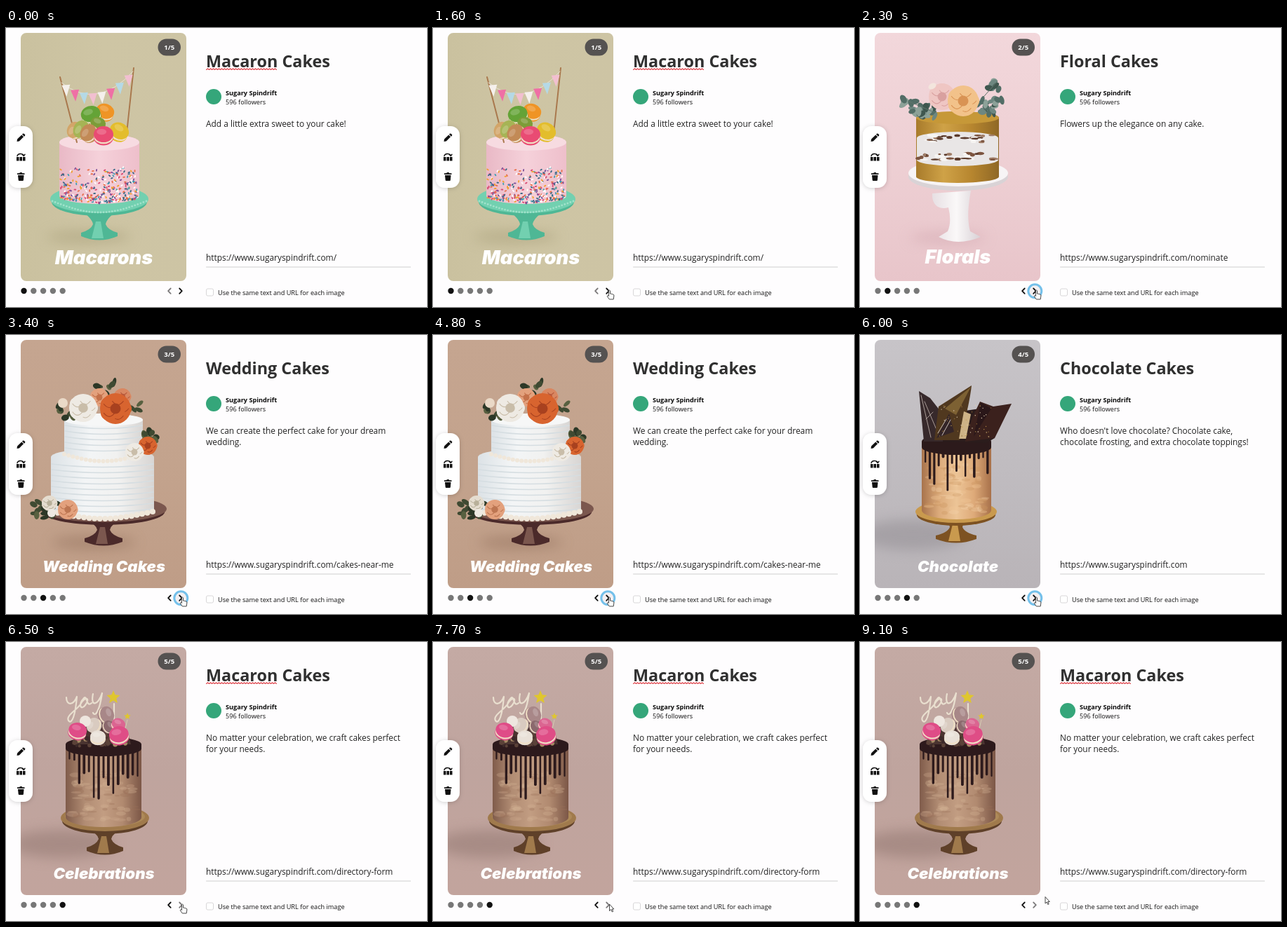
An HTML page that plays this animation: 600x398 px, repeating every 9.2 s.

```html
<!DOCTYPE html>
<html lang="en">
<head>
<meta charset="utf-8">
<style>
  html, body { margin: 0; width: 100%; height: 100%; overflow: hidden; background: #fefdfe; }
  svg { display: block; width: 600px; height: 398px; font-family: "Open Sans", "Noto Sans", sans-serif; fill: #222; }
  .title { font-size: 23.4px; font-weight: 700; fill: #303030; }
  .body { font-size: 11.9px; }
  .small { font-size: 9.17px; fill: #111; }
  .name { font-size: 9.15px; font-weight: 700; fill: #0a0a0a; }
  .badge { font-size: 9.6px; font-weight: 700; fill: #fff; text-anchor: middle; }
  .caption { font-family: Inter, sans-serif; font-weight: 900; font-style: italic; fill: #fff; text-anchor: middle; }
</style>
</head>
<body>
<svg id="stage" viewBox="0 0 600 398"></svg>
<script>
let seed = 7;
const rand = (lo = 0, hi = 1) => {
  seed = (seed * 16807) % 2147483647;
  return lo + (hi - lo) * seed / 2147483647;
};
const pick = list => list[Math.floor(rand(0, list.length))];
const times = (n, fn) => Array.from({ length: n }, (_, i) => fn(i)).join('');

// Shape helpers returning SVG markup
const oval = (x, y, rx, ry, fill, angle = 0) =>
  `<ellipse cx="${x}" cy="${y}" rx="${rx}" ry="${ry}" fill="${fill}" transform="rotate(${angle} ${x} ${y})"/>`;
const disc = (x, y, r, fill) => oval(x, y, r, r, fill);
const shape = (d, fill) => `<path d="${d}" fill="${fill}"/>`;
const line = (d, stroke, width = 1) =>
  `<path d="${d}" fill="none" stroke="${stroke}" stroke-width="${width}" stroke-linecap="round" stroke-linejoin="round"/>`;
const text = (x, y, cls, str) => `<text x="${x}" y="${y}" class="${cls}">${str}</text>`;
const soft = markup => `<g filter="url(#blur)" opacity=".5">${markup}</g>`;
const gradient = (id, stops, vertical) =>
  `<linearGradient id="${id}" ${vertical ? 'x2="0" y2="1"' : ''}>` +
  stops.map((c, i) => `<stop offset="${i / (stops.length - 1)}" stop-color="${c}"/>`).join('') + '</linearGradient>';

const barrel = (x1, x2, top, bottom, ry, fill) => {
  const rx = (x2 - x1) / 2;
  return shape(`M${x1} ${top}A${rx} ${ry} 0 0 1 ${x2} ${top}V${bottom}A${rx} ${ry} 0 0 1 ${x1} ${bottom}Z`, fill);
};
const stand = (x, y, rx, ry, foot, footRx, fill, shade) => {
  const neck = foot - 17, under = y + ry * .8;
  return shape(`M${x - 26} ${under}Q${x - 10} ${neck - 8} ${x - 9} ${neck}Q${x - 12} ${foot - 9} ${x - footRx} ${foot - 5}V${foot}Q${x} ${foot + 11} ${x + footRx} ${foot}V${foot - 5}Q${x + 12} ${foot - 9} ${x + 9} ${neck}Q${x + 10} ${neck - 8} ${x + 26} ${under}Z`, shade) +
    shape(`M${x - 5} ${neck - 4}H${x + 2}L${x + 6} ${foot + 3}H${x - 11}Z`, fill) +
    oval(x, y + 4, rx * .97, ry, shade) + oval(x, y, rx, ry, fill);
};
const macaron = (x, y, r, fill, angle = 0) =>
  `<g transform="rotate(${angle} ${x} ${y})">` + oval(x, y + r * .25, r, r * .78, fill) +
  oval(x, y + r * .2, r * .97, r * .68, '#f0dfc4') + oval(x, y - r * .1, r, r * .82, fill) +
  oval(x - r * .2, y - r * .35, r * .5, r * .3, '#ffffff2e') + '</g>';
const rose = (x, y, r, outer, inner) => disc(x, y, r, outer) +
  times(5, i => {
    const a = i * 1.257, px = x + Math.cos(a) * r * .5, py = y + Math.sin(a) * r * .5;
    return oval(px, py, r * .55, r * .48, outer) +
      line(`M${px - r * .35} ${py}q${r * .35} ${r * .45} ${r * .7} 0`, inner, 1.1);
  }) + disc(x, y, r * .34, inner);
const leaves = (x, y, n, spread, colors) => times(n, () =>
  oval(x + rand(-spread, spread), y + rand(-spread, spread) * .7, rand(4, 7), rand(2.5, 4.5), pick(colors), rand(0, 180)));
const drips = (x1, x2, y, dark, longest) => times(15, i => {
  const u = (i + .5) / 15, x = x1 + (x2 - x1) * u, top = y + 9 * Math.sin(Math.PI * u);
  return line(`M${x} ${top}V${top + rand(.15, 1) * longest}`, dark, rand(2.2, 4));
});
const frosting = (x1, x2, y1, y2, colors) => times(70, () =>
  oval(rand(x1 + 8, x2 - 8), rand(y1, y2), rand(3, 9), rand(1, 4), pick(colors)));
const star = (x, y, r) => shape('M' + Array.from({ length: 10 }, (_, i) => {
  const a = i * Math.PI / 5 - Math.PI / 2, q = i % 2 ? r * .45 : r;
  return `${x + q * Math.cos(a)} ${y + q * Math.sin(a)}`;
}).join('L') + 'Z', '#dfc62e');

function macaronCake() {
  const flags = ['#f5f0ec', '#ef6fa5', '#b5d9e6', '#f2bfd0'];
  const confetti = ['#d94a72', '#3f9fb3', '#f0a02e', '#7a4f9a', '#fff', '#e86f4a', '#3a6a86'];
  const rope = u => [79 + 102 * u, 78 - 16 * u + 96 * u * (1 - u)];
  return soft(oval(118, 298, 60, 9, '#a39a74')) + stand(133, 244, 70, 20, 297, 26, '#72d0b0', '#4fb795') +
    times(34, i => disc(66 + i * 4.06, 247 + 16 * Math.sin(Math.PI * i / 33), 1.4, '#a2e2cb')) +
    barrel(76, 190, 163, 239, 12, 'url(#pinkCake)') + oval(133, 163, 57, 12, '#f7dbe1') +
    times(310, () => {
      const x = rand(78, 188), y = 250 - 48 * rand() ** 1.8 - Math.abs(x - 133) * .12;
      return oval(x, y, 1.9, 1, pick(confetti), rand(0, 180));
    }) +
    line('M77 70L101 163M182 57L172 150', '#a9784d', 2) +
    line('M79 78Q130 118 181 62', '#e9e2d4') +
    times(8, i => {
      const [x, y] = rope((i + .5) / 8);
      return shape(`M${x - 6} ${y - 1}L${x + 6} ${y - 2}L${x + 1} ${y + 15}Z`, flags[i % 4]);
    }) +
    macaron(141, 120, 13, '#ef9425', 20) + macaron(121, 124, 14, '#64a337', -15) +
    macaron(131, 137, 11, '#7c9c38', 20) + macaron(98, 146, 12, '#d2a569', -65) +
    macaron(108, 145, 13, '#a6b455', -60) + macaron(118, 150, 13, '#c28a56', -55) +
    macaron(161, 148, 14, '#e3bd2c', 30) + macaron(139, 153, 14, '#e94b73');
}

function floralCake() {
  const green = ['#526d66', '#6d8780', '#3f574f', '#8ca198'];
  return soft(oval(125, 299, 55, 8, '#cfa3ac')) +
    shape('M103 236C102 252 112 260 126 256Q131 276 125 290L112 298Q139 312 172 298L157 290Q151 268 158 232Z', 'url(#china)') +
    oval(140, 212, 71, 20, '#d9d3d6') + oval(140, 207, 71, 19, '#f7f4f5') +
    barrel(80, 198, 128, 212, 9, 'url(#gold)') + barrel(81, 197, 157, 188, 9, '#e9e6e6') +
    times(60, () => oval(rand(84, 194), pick([158, 183]) + rand(-5, 5), rand(2, 7), rand(1, 2.5), pick(['#5b3a2b', '#7c543f', '#a07e68', '#f7f5f3']))) +
    oval(139, 128, 59, 9, '#c69838') +
    leaves(92, 116, 20, 19, green) + leaves(70, 106, 5, 9, green) +
    leaves(180, 113, 16, 14, green) + leaves(188, 82, 6, 10, green) + leaves(196, 106, 5, 7, green) +
    line('M68 104L105 120M170 105L196 76', '#60756c') +
    rose(117, 98, 19, '#efc6c3', '#d9a09f') + rose(147, 104, 22, '#f2c28a', '#d99354') +
    oval(103, 83, 6, 4, '#f3e5dd', -30);
}

function weddingCake() {
  const green = ['#3f4a32', '#586040', '#2c3827'];
  const cream = '#eeeae3', orange = '#d8642f', peach = '#e3a17d';
  const ridges = (x1, x2, y, n) => times(n, i => line(`M${x1} ${y + i * 8}Q${(x1 + x2) / 2} ${y + 9 + i * 8} ${x2} ${y + i * 8}`, '#d5dde1', 1.6));
  const beads = (x1, x2, y, n, r) => times(n, i => disc(x1 + (x2 - x1) * i / (n - 1), y + 10 * Math.sin(Math.PI * i / (n - 1)), r, '#f0e7da'));
  return soft(oval(125, 296, 60, 9, '#8f6d59')) + stand(139, 248, 90, 19, 295, 27, '#7b574e', '#4b2a2a') +
    barrel(64, 211, 174, 250, 12, 'url(#icing)') + ridges(65, 210, 184, 9) +
    beads(66, 209, 252, 20, 4) +
    barrel(83, 195, 122, 168, 10, 'url(#icing)') + ridges(84, 194, 129, 5) + beads(83, 194, 170, 19, 3) +
    oval(139, 121, 56, 9, '#f6f7f7') +
    leaves(82, 108, 9, 15, green) + leaves(178, 100, 10, 15, green) + leaves(142, 76, 6, 13, green) +
    rose(133, 89, 13, peach, '#c4714a') + rose(166, 88, 12, '#d98761', '#b8583a') +
    rose(156, 105, 22, orange, '#a8411f') + rose(110, 104, 20, cream, '#c9bda9') + disc(81, 97, 7, '#ead9c7') +
    leaves(206, 143, 8, 10, green) + rose(202, 158, 13, orange, '#a8411f') + rose(183, 167, 13, cream, '#c9bda9') +
    leaves(56, 248, 14, 18, green) + rose(62, 240, 11, '#e5ddd0', '#b8b09a') +
    rose(88, 249, 14, peach, '#bd7652') + disc(65, 254, 6, cream);
}

function chocolateCake() {
  const dark = '#2c1a1b';
  return soft(oval(75, 285, 75, 22, '#8f8a90')) + stand(137, 252, 58, 16, 291, 29, '#c99a4e', '#7d5222') +
    barrel(88, 187, 155, 250, 13, 'url(#caramel)') +
    frosting(88, 187, 185, 254, ['#f3d3ab55', '#c9925f55', '#f0c79755']) +
    drips(90, 185, 157, dark, 56) + barrel(88, 187, 152, 160, 11, dark) +
    shape('M92 152L98 118L120 112L150 108L178 104L192 147L180 154Z', '#2b1c1c') +
    shape('M84 80L100 90L122 118L118 152L91 152Z', '#37292b') + line('M87 86L101 146M92 95L112 142M94 120L104 110', '#b7aaa4', .9) +
    shape('M159 72Q156 100 142 150H106L112 102Z', '#50381f') + shape('M158 74L137 114L121 105Z', '#7d6133') +
    shape('M216 98L192 147L150 152L160 118L171 95L190 102Z', '#3b211d') + shape('M172 96L187 105L162 145Z', '#2a1719') +
    shape('M148 109L158 113L151 148H141Z', '#cdb286') + shape('M127 112L134 138L109 147Z', '#342528') +
    line('M123 120L111 140M129 121L117 143', '#c8beb8') +
    times(55, () => disc(rand(113, 188), rand(100, 147), .7, pick(['#c49a4a', '#8f6b35', '#e0cdb0'])));
}

function celebrationCake() {
  const dark = '#2d1a1c';
  return soft(oval(80, 288, 75, 20, '#8e736d')) + stand(141, 251, 63, 19, 298, 26, '#a07a4c', '#5f4029') +
    oval(141, 249, 57, 15, '#ad8959') +
    barrel(85, 193, 150, 250, 14, 'url(#mocha)') +
    frosting(85, 193, 185, 256, ['#d3b09455', '#99715855', '#c9a58a55']) +
    drips(87, 191, 150, dark, 66) + barrel(85, 193, 146, 152, 11, dark) +
    shape('M94 146Q108 112 140 112T178 146Z', '#4a3430') +
    times(26, () => disc(rand(94, 184), rand(132, 149), rand(2, 4), pick(['#5b4238', '#a68a63', '#3c2929']))) +
    line('M86 79C86 91 96 91 101 78C99 103 94 119 89 112C85 105 101 97 106 89C112 77 121 79 113 90C107 98 102 90 111 80C116 75 114 94 122 87M124 74C120 93 131 91 137 73C133 100 127 107 124 101M154 88V130', '#e9dfcf', 2.2) +
    star(153, 79, 10) + star(173, 106, 5) + line('M173 111L168 132', '#d8c9b2') +
    macaron(143, 104, 12, '#a88788', 70) + macaron(125, 119, 11, '#d9cbc0', -60) + disc(113, 113, 8, '#eee6df') +
    macaron(102, 127, 13, '#df4c87', 12) + macaron(146, 121, 9, '#8b696d', 60) +
    macaron(131, 136, 11, '#e9e1d8') + macaron(160, 118, 10, '#db6591', 20) + macaron(161, 133, 14, '#df4d86', -10);
}

const site = 'https://www.sugaryspindrift.com';
const slides = [
  { at: 0, bg: 'khaki', art: macaronCake, caption: 'Macarons', size: 27.3, base: 336.5, title: 'Macaron Cakes', flagged: true,
    lines: ['Add a little extra sweet to your cake!'], path: '/' },
  { at: 1700, bg: 'blush', art: floralCake, caption: 'Florals', size: 27.3, base: 336, title: 'Floral Cakes',
    lines: ['Flowers up the elegance on any cake.'], path: '/nominate' },
  { at: 3100, bg: 'tan', art: weddingCake, caption: 'Wedding Cakes', size: 22.2, base: 337.5, title: 'Wedding Cakes',
    lines: ['We can create the perfect cake for your dream', 'wedding.'], path: '/cakes-near-me' },
  { at: 4900, bg: 'grey', art: chocolateCake, caption: 'Chocolate', size: 22.2, base: 337.5, title: 'Chocolate Cakes',
    lines: ["Who doesn't love chocolate? Chocolate cake,", 'chocolate frosting, and extra chocolate toppings!'], path: '' },
  { at: 6400, bg: 'mauve', art: celebrationCake, caption: 'Celebrations', size: 22.2, base: 337.5, title: 'Macaron Cakes', flagged: true,
    lines: ['No matter your celebration, we craft cakes perfect', 'for your needs.'], path: '/directory-form' },
];

const slideMarkup = (s, i) => `<g class="slide"><g clip-path="url(#card)">
  <rect x="21" y="7" width="236" height="354" fill="url(#${s.bg})"/>${s.art()}</g>
  <text x="139.5" y="${s.base}" class="caption" font-size="${s.size}">${s.caption}</text>
  <rect x="216.5" y="15.5" width="32.5" height="24" rx="12" fill="#555251"/>
  ${text(232.8, 31, 'badge', `${i + 1}/5`)}
  ${text(285, 56, 'title', s.title)}
  ${s.flagged ? line('M285.5 59.5' + 'l2 -1.6l2 1.6'.repeat(25), '#dc3a42', 1.1) : ''}
  ${s.lines.map((l, n) => text(285, 140.5 + 16.7 * n, 'body', l)).join('')}
  ${text(285, 332, 'body', site + s.path)}</g>`;

const stage = document.getElementById('stage');
stage.innerHTML = `<defs>
  <clipPath id="card"><rect x="21" y="7" width="236" height="354" rx="8"/></clipPath>
  <filter id="shadow" x="-50%" y="-30%" width="200%" height="160%"><feDropShadow dx="0" dy="1" stdDeviation="3" flood-opacity=".18"/></filter>
  <filter id="blur" x="-50%" y="-100%" width="200%" height="300%"><feGaussianBlur stdDeviation="9"/></filter>
  ${gradient('khaki', ['#cac19f', '#cec5a4', '#cdc4a4'])}
  ${gradient('blush', ['#f2d7db', '#eed0d4', '#e8c5ca'], true)}
  ${gradient('tan', ['#c5a590', '#c3a38d', '#bf9d87'], true)}
  ${gradient('grey', ['#c7c4c8', '#c0bcc0', '#b9b4b8'], true)}
  ${gradient('mauve', ['#c4aaa4', '#bfa49e', '#c2a49d'], true)}
  ${gradient('pinkCake', ['#e9b9c6', '#f5d1da', '#eebfcb'])}
  ${gradient('china', ['#e7dfe3', '#faf8f8', '#d8d0d5'])}
  ${gradient('gold', ['#a87b2b', '#cfa247', '#b7862f', '#8f6826'])}
  ${gradient('icing', ['#dce2e6', '#f3f5f6', '#f1f1f0', '#d8d5d3'])}
  ${gradient('caramel', ['#a8734c', '#dcab7b', '#ecc496', '#deaa79', '#a8714a'])}
  ${gradient('mocha', ['#805c4b', '#b18c73', '#c29d82', '#b18a70', '#7c5747'])}
</defs>
${slides.map(slideMarkup).join('')}
<rect x="4" y="140" width="34" height="88" rx="13" fill="#fff" filter="url(#shadow)"/>
<g fill="#111">
  <path d="M15.5 162l.6-3.4 6.2-6.2 2.8 2.8-6.2 6.2zM23 151.700l1-1q1-.7 2 .2l.8.8q.9 1 .2 2l-1 1z"/>
  <path d="M15 184h3.500v5.500h-3.500zM19.500 184h3.500v5.500h-3.500zM24 184h3.500v5.500h-3.500z"/>
  <path d="M17 210h8.500l-.6 7q-.1 1-1.100 1h-5q-1 0-1.100-1zM16 207.300h3.200l.7-1.300h2.700l.7 1.300h3.200v1.700h-10.500z"/>
</g>
${line('M16 182.500Q17 179 21 179.500T25 182M23.300 180.800L25.300 182.500L27 180.300', '#111', 1.4)}
${disc(296, 98, 11, '#35a67a')}
${text(313, 96, 'name', 'Sugary Spindrift')}
${text(313, 108.500, 'small', '596 followers')}
${line('M285.500 341H576.500', '#cfcfcf')}
<rect x="285.500" y="372" width="10" height="10" rx="2" fill="#fff" stroke="#d8d6d8"/>
${text(302, 381.300, 'small', 'Use the same text and URL for each image')}
${times(5, i => `<circle class="dot" cx="${25.5 + i * 13.8}" cy="375" r="4.2"/>`)}
<circle id="ring" cx="249.300" cy="375.300" r="9.500" fill="#f3eff1" stroke="#74c0ea" stroke-width="3"/>
<g fill="none" stroke-width="1.800" stroke-linecap="round" stroke-linejoin="round">
  <path id="prev" d="M234.700 371.500l-3.600 3.700 3.600 3.700"/><path id="next" d="M247.200 371.500l3.600 3.700-3.600 3.700"/>
</g>
<g id="cursor" fill="#fff" stroke="#333" stroke-width=".9" stroke-linejoin="round">
  <path id="arrow" d="M0 0V9.500L2.200 7.500 3.800 11 5.200 10.300 3.700 7H6.300Z"/>
  <path id="hand" d="M-1 .8Q0-.6 1 .8V5L2.700 5.300 4.200 5.700 5.700 6.200Q6.600 6.600 6.400 8L5.700 13H-.2L-3 9.200Q-3.500 7.700-2.200 7.600L-1 8.500Z"/>
</g>`;

const byId = id => document.getElementById(id);
const groups = [...stage.querySelectorAll('.slide')], dots = [...stage.querySelectorAll('.dot')];
const show = (node, on) => node.setAttribute('display', on ? 'inline' : 'none');
const enabled = (id, on) => byId(id).setAttribute('stroke', on ? '#111' : '#7c7a7b');

// Cursor stops: time, x, y
const route = [[400, 84, 345], [1300, 251.5, 374], [7900, 251.5, 374], [8100, 263, 360], [8200, 264, 363.5]];
function cursorAt(t) {
  const k = route.findIndex(p => p[0] > t);
  if (k <= 0) return (k ? route[route.length - 1] : route[0]).slice(1);
  const [a, b] = [route[k - 1], route[k]];
  const u = (t - a[0]) / (b[0] - a[0]), e = u * u * (3 - 2 * u);
  return [a[1] + (b[1] - a[1]) * e, a[2] + (b[2] - a[2]) * e];
}

function draw(now) {
  const t = Math.floor((now % 9200) / 100) * 100;
  const current = slides.filter(s => s.at <= t).length - 1;
  groups.forEach((g, i) => show(g, i === current));
  dots.forEach((d, i) => d.setAttribute('fill', i === current ? '#111' : '#777'));
  enabled('prev', current > 0);
  enabled('next', current < 4);
  show(byId('ring'), current > 0 && current < 4);
  const [x, y] = cursorAt(t), pointing = x > 240 && t < 7700;
  show(byId('cursor'), t >= 400);
  show(byId('hand'), pointing);
  show(byId('arrow'), !pointing);
  byId('cursor').setAttribute('transform', `translate(${x} ${y})`);
  requestAnimationFrame(draw);
}
requestAnimationFrame(draw);
</script>
</body>
</html>
```
